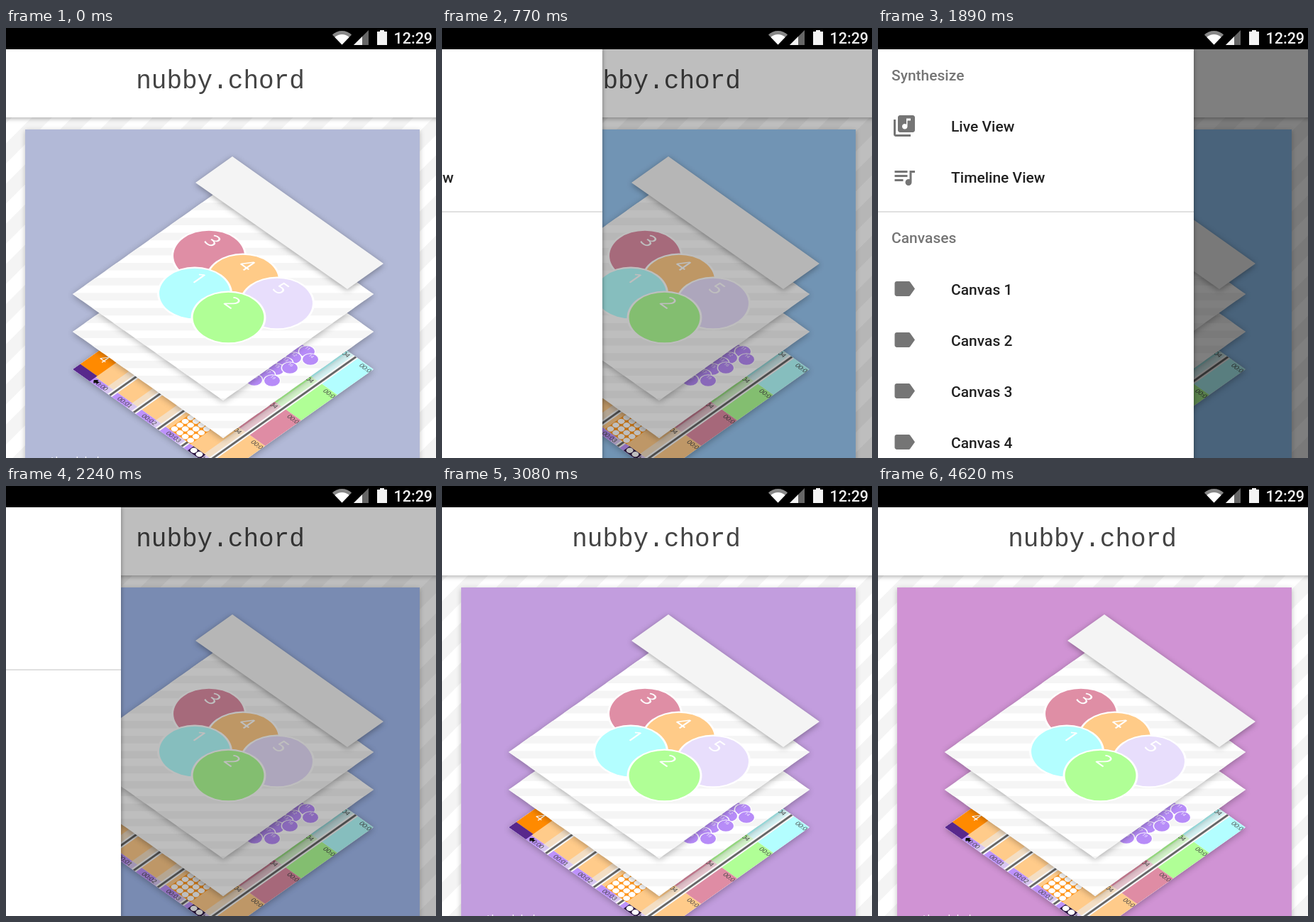
These frames come from a looping animation (606 px wide and 606 px high, 4690 ms). An HTML page with a canvas:

```html
<!DOCTYPE html>
<html lang="en">
<head>
<meta charset="utf-8">
<title>Synth drawer</title>
<style>
  html, body { margin: 0; width: 100%; height: 100%; overflow: hidden; background: #fff; }
  canvas { display: block; width: 606px; height: 606px; }
</style>
</head>
<body>
<canvas id="stage" width="606" height="606"></canvas>
<script>
const SIZE = 606, LOOP = 4690, STEP = 70, DRAWER = 445;
const stage = document.getElementById('stage').getContext('2d');

const ICONS = {
  library: 'M20 2H8c-1.1 0-2 .9-2 2v12c0 1.1.9 2 2 2h12c1.1 0 2-.9 2-2V4c0-1.1-.9-2-2-2zm-2 5h-3v5.5c0 1.38-1.12 2.5-2.5 2.5S10 13.88 10 12.5s1.12-2.5 2.5-2.5c.57 0 1.08.19 1.5.51V5h4v2zM4 6H2v14c0 1.1.9 2 2 2h14v-2H4V6z',
  queue: 'M15 6H3v2h12V6zm0 4H3v2h12v-2zM3 16h8v-2H3v2zM17 6v8.18c-.31-.11-.65-.18-1-.18-1.66 0-3 1.34-3 3s1.34 3 3 3 3-1.34 3-3V8h3V6h-5z',
  label: 'M17.63 5.84C17.27 5.33 16.67 5 16 5L5 5.01C3.9 5.01 3 5.9 3 7v10c0 1.1.9 1.99 2 1.99L16 19c.67 0 1.27-.33 1.63-.84L22 12l-4.37-6.16z'
};

function layer(draw) {
  const c = document.createElement('canvas');
  c.width = c.height = SIZE;
  draw(c.getContext('2d'));
  return c;
}

function rect(g, color, x, y, w, h) {
  g.fillStyle = color;
  g.fillRect(x, y, w, h);
}

function shape(g, color, points) {
  g.beginPath();
  points.forEach(([x, y]) => g.lineTo(x, y));
  g.closePath();
  g.fillStyle = color;
  g.fill();
}

function dot(g, x, y, r, color) {
  g.beginPath();
  g.arc(x, y, r, 0, 7);
  g.fillStyle = color;
  g.fill();
}

function write(g, text, x, y, font, color, align = 'left') {
  g.font = font;
  g.fillStyle = color;
  g.textAlign = align;
  g.fillText(text, x, y);
}

function shadow(g, alpha, blur, dx, dy) {
  g.shadowColor = `rgba(0,0,0,${alpha})`;
  g.shadowBlur = blur;
  g.shadowOffsetX = dx;
  g.shadowOffsetY = dy;
}

// Isometric plane: x runs down-right, y runs down-left.
function tilt(g, x, y) {
  g.setTransform(.7067, .5, -.7067, .5, x, y);
}

function bubble(g, x, y, r, color, digit, edge) {
  g.save();
  tilt(g, x, y);
  dot(g, 0, 0, r + edge, '#fff');
  dot(g, 0, 0, r, color);
  g.textBaseline = 'middle';
  write(g, digit, -r * .34, -r * .46, `${r * .62}px "Noto Sans", sans-serif`, '#fff', 'center');
  g.restore();
}

// Fills a tilted square and leaves it as the clip.
function diamond(g, y) {
  tilt(g, 94, y);
  shadow(g, .3, 10, 0, 2);
  rect(g, '#fff', 0, -300, 300, 300);
  shadow(g, 0, 0, 0, 0);
  g.beginPath();
  g.rect(0, -300, 300, 300);
  g.clip();
}

function sheet(g, y) {
  g.save();
  diamond(g, y);
  g.setTransform(1, 0, 0, 1, 0, 0);
  for (let s = y - 150; s < y + 150; s += 21.2) rect(g, '#f5f5f5', 90, s, 432, 10.6);
  g.restore();
}

function timeline(g, y) {
  const rows = ['#bd92fb', '#ffcb8a', '#df8ca4', '#b0ff96', '#b3feff'];
  g.save();
  diamond(g, y);
  rows.forEach((color, i) => rect(g, color, 0, -12 - 72 * i, 300, 72));
  for (let u = 74; u < 300; u += 47.8) {
    rect(g, 'rgba(236,236,236,.6)', u - 15, -300, 10, 300);
    rect(g, '#f6f6f6', u - 5, -300, 9, 300);
    rect(g, '#666', u - 2, -300, 3.5, 300);
  }
  rows.forEach((color, i) => {
    for (let k = 0; k < 6; k++)
      write(g, '00:0' + k, 50 + 48.6 * k, -2 - 72 * i, '10px Lato, sans-serif', '#444', 'center');
  });

  rect(g, '#ff8a00', 0, -84, 34, 69);
  rect(g, '#58288c', 0, -15, 34, 15);
  write(g, '4', 17, -39, '20px "Noto Sans", sans-serif', '#fff', 'center');
  shape(g, '#111', [[36, -6], [41, -11], [41, -8], [45, -8], [45, -4], [41, -4], [41, -1]]);

  rect(g, '#ff9820', 180, -56, 43, 44);
  for (let i = 0; i < 16; i++)
    dot(g, 185.5 + i % 4 * 10.7, -17.5 - (i >> 2) * 10.7, 4.9, '#fff');
  rect(g, '#2b1740', 229, -12, 24, 12);
  for (let i = 0; i < 2; i++) dot(g, 235 + i * 11, -6.5, 5, '#fff');
  g.restore();
}

const page = layer(g => {
  rect(g, '#fff', 0, 0, SIZE, SIZE);
  for (let x = -20; x < 1250; x += 56.6)
    shape(g, '#f4f4f4', [[x, 126], [x + 28.3, 126], [x - 451.7, 606], [x - 480, 606]]);
  g.save();
  shadow(g, .3, 6, 0, 2);
  rect(g, '#fff', -10, 30, SIZE + 20, 96);
  g.restore();
  write(g, 'nubby.chord', 302, 85, '36px "Liberation Mono", monospace', '#444', 'center');
  g.save();
  shadow(g, .25, 7, 0, 2);
  rect(g, '#fff', 27, 143, 556, 480);
  g.restore();
});

const art = layer(g => {
  timeline(g, 481);
  sheet(g, 428);
  [[412, 453], [424, 456], [405, 465], [393, 472], [429, 467], [381, 481],
   [400, 479], [368, 489], [350, 496], [375, 497]]
    .forEach(([x, y], i) => bubble(g, x, y, 11, '#b78cf8', 10 + i, 1.4));
  sheet(g, 375);
  bubble(g, 286, 321, 50, '#df8ea5', 3, 3);
  bubble(g, 334, 355, 50, '#ffcb88', 4, 3);
  bubble(g, 382, 388, 50, '#e8defc', 5, 3);
  bubble(g, 266, 374, 50, '#b3feff', 1, 3);
  bubble(g, 313.5, 408, 50, '#b0ff96', 2, 3);
  g.save();
  shadow(g, .35, 9, 0, 2);
  shape(g, '#f4f4f4', [[319, 181], [532, 332], [481, 368], [267, 218]]);
  g.restore();
  write(g, 'the blob', 62, 620, '300 22px Roboto, sans-serif', '#fff');
});

const menu = layer(g => {
  const font = '500 21px Roboto, sans-serif';
  const item = (icon, text, mid) => {
    g.save();
    g.translate(19, mid - 18);
    g.scale(1.5, 1.5);
    g.fillStyle = '#757575';
    g.fill(new Path2D(ICONS[icon]));
    g.restore();
    write(g, text, 103, mid + 8, font, '#212121');
  };
  rect(g, '#fff', 0, 30, DRAWER, 576);
  write(g, 'Synthesize', 19, 74, font, '#757575');
  item('library', 'Live View', 138);
  item('queue', 'Timeline View', 210);
  rect(g, '#e0e0e0', 0, 258, DRAWER, 2);
  write(g, 'Canvases', 19, 303, font, '#757575');
  for (let i = 0; i < 4; i++) item('label', 'Canvas ' + (i + 1), 367.5 + 72 * i);
});

const status = layer(g => {
  const fan = (r, color) => {
    g.beginPath();
    g.moveTo(473.5, 23.5);
    g.arc(473.5, 23.5, r, -Math.PI * .745, -Math.PI * .255);
    g.fillStyle = color;
    g.fill();
  };
  rect(g, '#000', 0, 0, SIZE, 30);
  fan(19.5, '#888');
  fan(14.5, '#fff');
  shape(g, '#666', [[490, 24], [511, 3], [511, 24]]);
  shape(g, '#f4f4f4', [[490, 24], [502, 12], [502, 24]]);
  rect(g, '#f4f4f4', 523, 5, 14, 19);
  rect(g, '#f4f4f4', 527, 3, 6, 3);
  write(g, '12:29', 546.5, 22, '500 21.5px Roboto, sans-serif', '#eee');
});

// Solves the CSS "ease" curve, cubic-bezier(.25, .1, .25, 1).
function ease(p) {
  const bez = (a, b, s) => 3 * a * s * (1 - s) ** 2 + 3 * b * s * s * (1 - s) + s ** 3;
  let lo = 0, hi = 1;
  for (let i = 0; i < 24; i++) {
    const mid = (lo + hi) / 2;
    if (bez(.25, .25, mid) < p) lo = mid; else hi = mid;
  }
  return bez(.1, 1, lo);
}

const HUES = [[239, 154, 154], [144, 202, 249], [206, 147, 216], [239, 154, 154]];
const FADE = 2720, FADE_START = -1020;

function cardColor(t) {
  const n = (t - FADE_START) / FADE, i = Math.floor(n), k = ease(n - i);
  return `rgb(${HUES[i].map((c, j) => Math.round(c + (HUES[i + 1][j] - c) * k))})`;
}

// Time, drawer edge, speed in px/ms.
const DRAG = [[290, 0, .2], [770, 226, .62], [1190, 438, .09], [1400, DRAWER, 0]];
const CLOSE = 2170, CLOSE_TIME = 245;

function drawerState(t) {
  if (t <= DRAG[0][0]) return { edge: 0, dim: 0 };
  if (t >= CLOSE) {
    const left = Math.max(0, 1 - (t - CLOSE) / CLOSE_TIME);
    return { edge: DRAWER * left ** 3, dim: .5 * left ** 2 };
  }
  let edge = DRAWER;
  for (let i = 0; i < DRAG.length - 1; i++) {
    const [t0, x0, v0] = DRAG[i], [t1, x1, v1] = DRAG[i + 1];
    if (t < t0 || t > t1) continue;
    const d = t1 - t0, s = (t - t0) / d;
    edge = x0 + (x1 - x0) * s * s * (3 - 2 * s)
         + d * s * (1 - s) * (v0 * (1 - s) - v1 * s);
  }
  return { edge, dim: .5 * edge / DRAWER };
}

function frame() {
  const t = Math.floor(performance.now() % LOOP / STEP) * STEP;
  const { edge, dim } = drawerState(t);
  const g = stage;
  g.drawImage(page, 0, 0);
  rect(g, cardColor(t), 27, 143, 556, 463);
  g.drawImage(art, 0, 0);
  if (dim > 0) rect(g, `rgba(0,0,0,${dim})`, 0, 30, SIZE, 576);
  if (edge > 0) {
    const x = Math.round(edge - DRAWER);
    g.save();
    shadow(g, .3, 5, 1, 0);
    rect(g, '#fff', x, 30, DRAWER, 600);
    g.restore();
    g.drawImage(menu, x, 0);
  }
  g.drawImage(status, 0, 0);
  requestAnimationFrame(frame);
}
frame();
</script>
</body>
</html>
```
